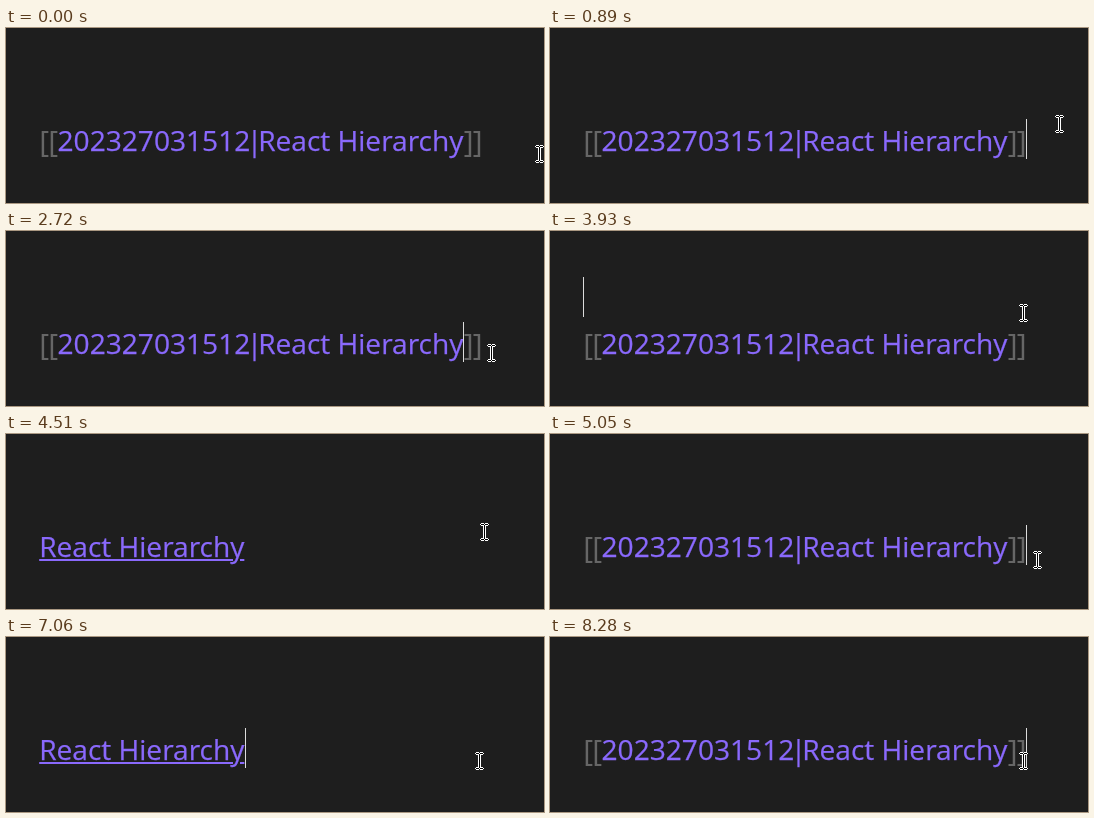
These frames come from a looping animation (538 px wide and 175 px high, 8.45 s). An HTML page:

```html
<!DOCTYPE html>
<html lang="en">
<head>
<meta charset="utf-8">
<title>Wiki link editing</title>
<style>
html, body { margin: 0; width: 100%; height: 100%; overflow: hidden; background: #1e1e1e; }
#stage { position: relative; width: 538px; height: 175px; overflow: hidden;
  font: 28.1px/40px "Open Sans", "Noto Sans", sans-serif; color: #8a69fc; }
#stage span { position: absolute; top: 92px; white-space: pre; -webkit-text-stroke: .25px; }
#stage .mark { top: 93px; font-size: 30px; letter-spacing: -.8px; color: #666; -webkit-text-stroke: 0; }
#link { left: 33.2px; text-decoration: underline 2px; text-underline-offset: 2px; }
#caret { position: absolute; width: 1px; height: 40px; background: #dcdcdc; }
#beam { position: absolute; left: 0; top: 0; }
</style>
</head>
<body>
<div id="stage">
  <div id="raw">
    <span class="mark" style="left:33.2px">[[</span>
    <span style="left:51.5px">202327031512</span>
    <span style="left:240.8px">|</span>
    <span style="left:252.2px">React Hierarchy</span>
    <span class="mark" style="left:457.8px">]]</span>
  </div>
  <span id="link">React Hierarchy</span>
  <div id="caret"></div>
  <svg id="beam" width="9" height="18" shape-rendering="crispEdges">
    <defs><path id="core" d="M1 1h3v1h-3zM5 1h3v1h-3zM4 2h1v14h-1zM1 16h3v1h-3zM5 16h3v1h-3z"/></defs>
    <g fill="#fff">
      <use href="#core" x="-1"/><use href="#core" x="1"/>
      <use href="#core" y="-1"/><use href="#core" y="1"/>
    </g>
    <use href="#core"/>
  </svg>
</div>
<script>
const LOOP = 8450, STEP = 80, LAG = 160, BLINK = 530;
const TOP_LINE = 33, LINK_END = 239, NAME_END = 457, RAW_END = 476;
const [raw, link, caret, beam] = ["raw", "link", "caret", "beam"].map(id => document.getElementById(id));

// Where each click puts the caret
const clicks = [
  { at: 340, x: RAW_END }, { at: 1370, x: TOP_LINE },
  { at: 2560, x: NAME_END }, { at: 2800, x: RAW_END }, { at: 3930, x: TOP_LINE },
  { at: 4890, x: RAW_END }, { at: 5940, x: TOP_LINE },
  { at: 6990, x: RAW_END }
];

// Pointer stops: start, end, x, y
const stops = [
  [80, 80, 528, 113],
  [580, 1290, 465, 41],
  [2020, 2480, 481, 113],
  [3270, 3450, 473, 86],
  [3660, 3860, 469, 73],
  [4420, 4730, 483, 117],
  [5380, 5860, 459, 74],
  [6510, 6910, 469, 115]
];

const smooth = p => p * p * (3 - 2 * p);
const lastClick = t => clicks.filter(c => c.at <= t).pop();
const show = (node, on) => node.style.display = on ? "" : "none";

function pointer(t) {
  let x = 529, y = 117;
  for (const [start, end, tx, ty] of stops) {
    if (t < start) break;
    const moved = (Math.floor((t - start) / STEP) + 1) * STEP;
    const p = smooth(Math.min(1, moved / (end - start + STEP)));
    x += (tx - x) * p;
    y += (ty - y) * p;
  }
  return [Math.round(x), Math.round(y)];
}

function draw(t) {
  // The text reacts a moment after the click
  const rendered = lastClick(t - LAG)?.x === TOP_LINE;
  show(raw, !rendered);
  show(link, rendered);

  const click = lastClick(t);
  if (click) {
    const onTop = click.x === TOP_LINE;
    const age = t - click.at - (onTop ? 0 : LAG);
    show(caret, age % (2 * BLINK) < BLINK);
    caret.style.left = (rendered && !onTop ? LINK_END : click.x) + "px";
    caret.style.top = (onTop ? 46 : 91) + "px";
  } else show(caret, false);

  const [x, y] = pointer(t);
  beam.style.transform = `translate(${x}px, ${y}px)`;
}

const began = performance.now();
function tick() {
  draw((performance.now() - began) % LOOP);
  requestAnimationFrame(tick);
}
tick();
</script>
</body>
</html>
```
